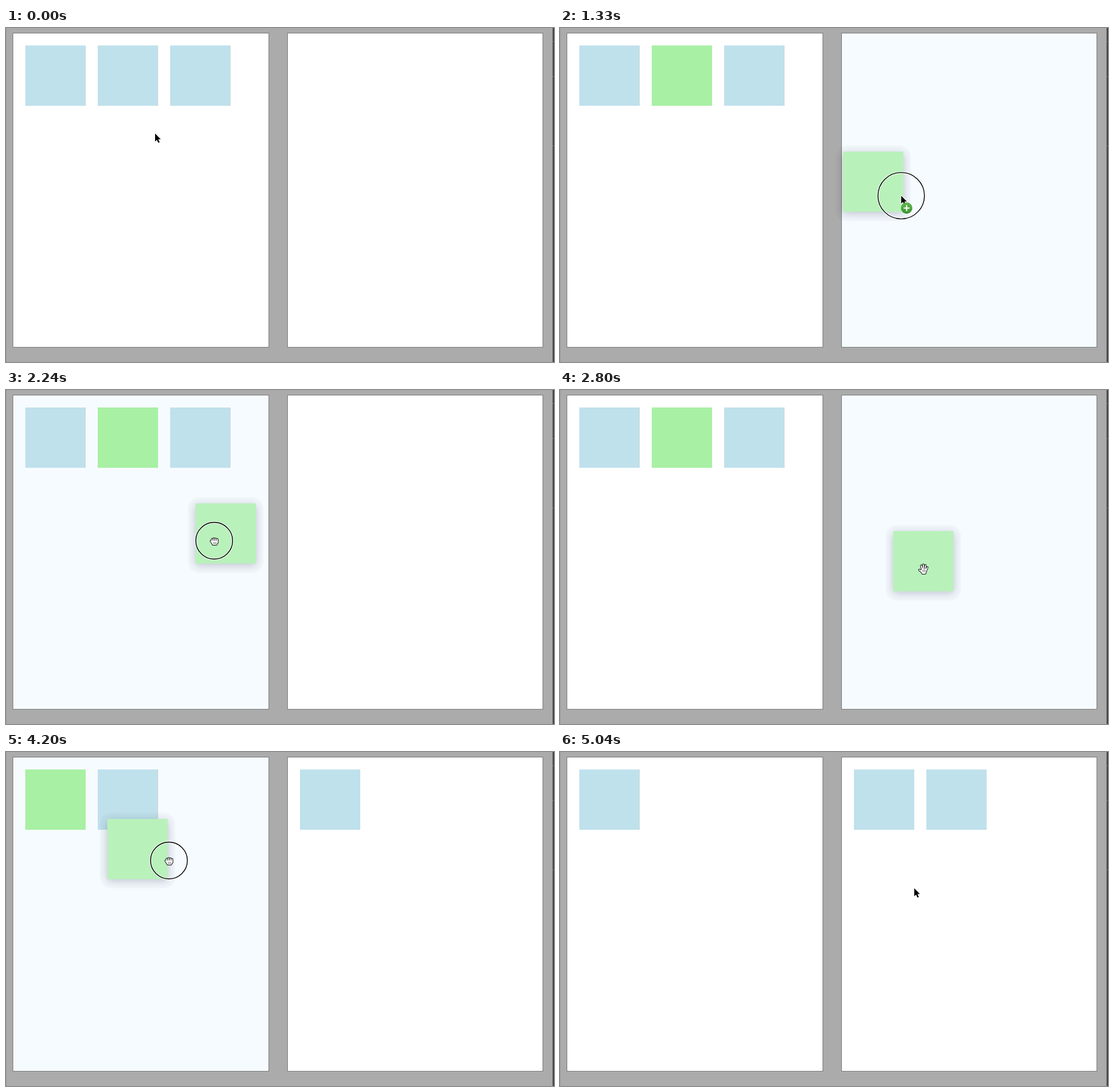
Animation of 908x554 px, one loop 5320 ms. Source, as an HTML page with a canvas:

```html
<!DOCTYPE html>
<html lang="en">
<head>
<meta charset="utf-8">
<title>Dragging squares between panels</title>
<style>
html, body { margin: 0; width: 100%; height: 100%; overflow: hidden; background: #ababab; }
canvas { display: block; }
</style>
</head>
<body>
<canvas id="stage" width="908" height="554"></canvas>
<script>
const c = document.getElementById('stage').getContext('2d');
const LOOP = 5320, STEP = 70;
const PANELS = [{ x: 12, w: 423 }, { x: 467, w: 422 }];
const BLUE = '#bfe1ec', GREEN = '#a8f0a4', HOVER = '#f6fbff';

// Pointer path: time, x, y
const PATH = [
  [0, 247, 175], [280, 203, 94], [490, 203, 94], [700, 234, 234], [770, 234.5, 234.5],
  [1050, 330, 250], [1260, 520, 270], [1470, 620, 290], [1680, 550, 282.5], [1750, 533, 280],
  [2030, 445, 265], [2240, 345, 250], [2520, 540, 280], [2730, 603, 299], [2800, 602, 296],
  [2870, 603, 297], [3150, 603, 297], [3640, 79, 76], [3850, 79, 76], [4200, 270, 180],
  [4410, 553, 228], [4480, 567, 227], [4690, 587, 226], [LOOP, 587, 226]
];

const DRAGS = [
  { press: 350, start: 560, release: 2800, drop: 2870, index: 1, dx: 51, dy: 65 },
  { press: 3710, start: 3920, release: 4830, drop: 4900, index: 0, dx: 47, dy: 47 }
];

const ARROW = new Path2D('M0 0V13.2L3 10.4L5.3 15.6L7.6 14.6L5.3 9.6H9.4Z');
const OPEN = {
  fingers: new Path2D('M-3.5-5.5L-1.5 2M0-7V2M3.5-6L2.5 2M6.5-2.5L4 3M-6.5 1.5L-2 5'),
  palm: new Path2D('M-3 2L4.5 1L3 7H-1.5Z')
};
const CLOSED = {
  fingers: new Path2D('M-3.5-3.5V1M-.5-4.5V1M2.5-4V1M5.2-3V2M-5.5-.5L-3 3'),
  palm: new Path2D('M-4 0L5 0L3.5 5H-2Z')
};
const CREASES = new Path2D('M-1 1.5V4.5M1 1.5V4.5M3 1.5V4.5');

function slope(i, k) {
  const a = PATH[i], b = PATH[i + 1];
  return a && b ? (b[k] - a[k]) / (b[0] - a[0]) : 0;
}

function tangent(i, k) {
  const a = slope(i - 1, k), b = slope(i, k);
  return a * b > 0 ? 2 * a * b / (a + b) : 0;
}

// Monotone cubic through the path points
function pointer(t) {
  let i = 0;
  while (i < PATH.length - 2 && t >= PATH[i + 1][0]) i++;
  const h = PATH[i + 1][0] - PATH[i][0], u = (t - PATH[i][0]) / h, v = 1 - u;
  return [1, 2].map(k =>
    v * v * (1 + 2 * u) * PATH[i][k] + u * u * (3 - 2 * u) * PATH[i + 1][k] +
    h * u * v * (v * tangent(i, k) - u * tangent(i + 1, k)));
}

function box(x, y, w, h, fill) {
  c.fillStyle = fill;
  c.fillRect(x, y, w, h);
}

function line(path, color, width) {
  c.strokeStyle = color;
  c.lineWidth = width;
  c.stroke(path);
}

function panel({ x, w }, hover) {
  box(x - 1, 8, w + 2, 522, '#7c7c7c');
  box(x, 9, w, 520, hover ? HOVER : '#fff');
}

function squares(side, count, active) {
  for (let i = 0; i < count; i++) {
    const x = PANELS[side].x + 20 + i * 120;
    box(x, 29, 100, 100, i === active ? GREEN : BLUE);
    if (!side && i !== active) box(x + 99, 29, 1, 100, '#cbd4d8');
  }
}

function ghost(x, y) {
  x = Math.round(x);
  y = Math.round(y);
  c.fillStyle = 'rgba(40,40,80,.025)';
  c.beginPath();
  c.roundRect(x - 12, y - 10, 124, 125, 18);
  c.fill();
  c.save();
  c.shadowColor = 'rgba(30,30,60,.24)';
  c.shadowBlur = 13;
  c.shadowOffsetY = 2.5;
  box(x, y, 100, 100, '#b9f1bb');
  c.restore();
}

function ring(x, y, r) {
  const circle = new Path2D();
  circle.arc(x, y, r, 0, 7);
  line(circle, 'rgba(255,255,255,.6)', 4);
  line(circle, '#000', 1.4);
}

function hand({ fingers, palm }) {
  c.translate(0, 1);
  line(fingers, '#111', 3.8);
  line(palm, '#111', 3.8);
  line(fingers, '#fff', 1.9);
  line(palm, '#fff', 1.9);
  c.fillStyle = '#fff';
  c.fill(palm);
  line(CREASES, '#444', .7);
}

function arrow() {
  line(ARROW, '#fff', 2);
  c.fillStyle = '#000';
  c.fill(ARROW);
}

function badge() {
  c.beginPath();
  c.arc(9, 20.5, 9.5, 0, 7);
  const g = c.createLinearGradient(0, 11, 0, 30);
  g.addColorStop(0, '#62b64c');
  g.addColorStop(1, '#3c9331');
  c.fillStyle = g;
  c.fill();
  box(4, 19.5, 10, 2, '#fff');
  box(8, 15.5, 2, 10, '#fff');
}

function draw(t) {
  const [x, y] = pointer(t);
  const side = PANELS.findIndex(p => x >= p.x && x < p.x + p.w);
  const drag = DRAGS.find(d => t >= d.start && t < d.drop);
  const pressed = DRAGS.some(d => t >= d.press && t < d.release);
  const moved = DRAGS.filter(d => t >= d.drop).length;
  const copying = drag && pressed && side === 1;

  box(0, 0, 908, 554, '#ababab');
  box(0, 0, 1, 554, '#9c9c9c');
  box(905, 0, 1, 554, '#8c8c8c');
  box(906, 0, 2, 554, '#444');
  for (const mark of [22, 80, 195]) box(906, mark, 2, 1, '#777');

  PANELS.forEach((p, i) => panel(p, drag && side === i));
  squares(0, 3 - moved, drag ? drag.index : -1);
  squares(1, moved, -1);

  if (drag) {
    const [gx, gy] = pointer(t - STEP);
    ghost(gx - drag.dx, gy - drag.dy);
  }
  if (pressed) ring(x, y, copying ? 38.5 : 30.5);

  const column = (x - 32) % 120;
  const over = side === 0 && y > 29 && y < 129 && column > 0 && column < 100;
  c.save();
  c.translate(x, y);
  c.lineCap = c.lineJoin = 'round';
  if (copying) {
    arrow();
    badge();
  } else if (drag) hand(pressed ? CLOSED : OPEN);
  else if (over) hand(OPEN);
  else arrow();
  c.restore();
}

const begin = performance.now();
function tick() {
  const t = (performance.now() - begin) % LOOP;
  draw(Math.floor(t / STEP) * STEP);
  requestAnimationFrame(tick);
}
tick();
</script>
</body>
</html>
```
